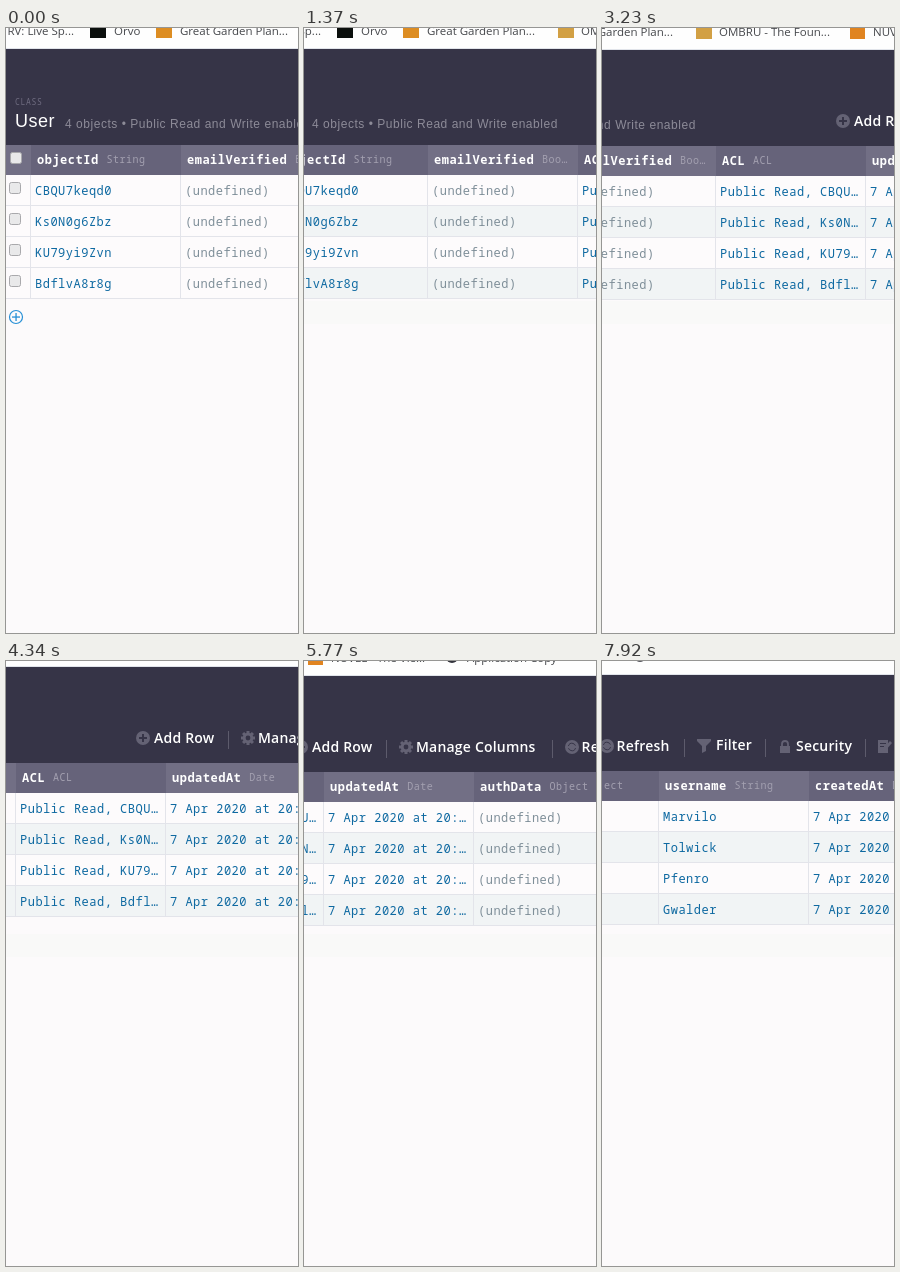
An HTML page with a canvas that plays this animation: 292 by 605 pixels, repeating every 8 s.

```html
<!DOCTYPE html>
<html lang="en">
<head>
<meta charset="utf-8">
<title>Data browser pan</title>
<style>
  html, body { margin: 0; width: 100%; height: 100%; overflow: hidden; background: #fcfafb; }
  canvas { display: block; width: 292px; height: 605px; }
</style>
</head>
<body>
<canvas id="stage" width="292" height="605"></canvas>
<script>
const W = 292, H = 605, LOOP = 8000;
const ctx = document.getElementById('stage').getContext('2d');

const MONO = '"Noto Sans Mono", monospace';
const SANS = '"Open Sans", "Noto Sans", sans-serif';
const ARIAL = '"Liberation Sans", Arial, sans-serif';
const ICON = '#646274', DARK = '#363447', LINK = '#0e69a1', MUTED = '#7f8f99';

// Bursts of camera steps: first time, last time, count
const bursts = [
  [140, 1110, 8], [1250, 1370, 2], [1490, 2270, 7], [2680, 3230, 5], [3370, 3640, 3],
  [3790, 3910, 2], [4340, 4340, 1], [4500, 4880, 4], [5250, 5250, 1], [5370, 5910, 5],
  [6220, 7030, 7], [7480, 7920, 4]
];
const stepTimes = bursts.flatMap(([a, b, n]) =>
  Array.from({ length: n }, (_, k) => a + (n > 1 ? (b - a) * k / (n - 1) : 0)));

// Camera position by step number
const panX = [[0, 0], [10, 51], [22, 211], [28, 315], [33, 385], [41, 585], [49, 718]];
const panY = [[0, 0], [10, 0], [15, 2], [22, 1], [25, 0], [27, -10], [28, -15],
              [33, -5], [41, -8], [45, -5], [49, -7]];

// Monotone cubic through the keys
function curve(keys, s) {
  const slope = i => (keys[i + 1][1] - keys[i][1]) / (keys[i + 1][0] - keys[i][0]);
  const last = keys.length - 1;
  const tangent = i => {
    if (i === 0) return slope(0);
    if (i === last) return slope(last - 1);
    const a = slope(i - 1), b = slope(i);
    return a * b <= 0 ? 0 : 2 * a * b / (a + b);
  };
  let i = 0;
  while (i < last - 1 && s >= keys[i + 1][0]) i++;
  const [x0, y0] = keys[i], [x1, y1] = keys[i + 1];
  const h = x1 - x0, u = (s - x0) / h, v = 1 - u;
  return y0 * (1 + 2 * u) * v * v + tangent(i) * h * u * v * v +
         y1 * u * u * (3 - 2 * u) - tangent(i + 1) * h * u * u * v;
}

const ids = ['CBQU7keqd0', 'Ks0N0g6Zbz', 'KU79yi9Zvn', 'BdflvA8r8g'];
const users = ['Marvilo', 'Tolwick', 'Pfenro', 'Gwalder'];
const none = () => '(undefined)';
const date = () => '7 Apr 2020 at 20:…';
const columns = [
  ['objectId', 'String', r => ids[r]],
  ['emailVerified', 'Boo…', none],
  ['ACL', 'ACL', r => 'Public Read, ' + ids[r].slice(0, 4) + '…'],
  ['updatedAt', 'Date', date],
  ['authData', 'Object', none],
  ['username', 'String', r => users[r]],
  ['createdAt', 'Date', date]
];
const colX = i => 25 + 150 * i;

function box(x, y, w, h, color) {
  ctx.fillStyle = color;
  ctx.fillRect(x, y, w, h);
}
function text(str, x, y, font, color, spacing = 0) {
  ctx.font = font;
  ctx.letterSpacing = spacing + 'px';
  ctx.fillStyle = color;
  ctx.fillText(str, x, y);
}
function disc(x, y, r, color) {
  ctx.fillStyle = color;
  ctx.beginPath();
  ctx.arc(x, y, r, 0, 7);
  ctx.fill();
}
function poly(points, color) {
  ctx.fillStyle = color;
  ctx.beginPath();
  points.forEach(([x, y]) => ctx.lineTo(x, y));
  ctx.fill();
}
function arc(x, y, r, from, to, color, width) {
  ctx.strokeStyle = color;
  ctx.lineWidth = width;
  ctx.beginPath();
  ctx.arc(x, y, r, from, to);
  ctx.stroke();
}
function checkbox(x, y) {
  ctx.fillStyle = '#e9e9ea';
  ctx.strokeStyle = '#a9a9ac';
  ctx.lineWidth = 1;
  ctx.beginPath();
  ctx.roundRect(x + .5, y + .5, 11, 11, 2);
  ctx.fill();
  ctx.stroke();
}

function bookmarks() {
  const label = (str, x) => text(str, x, 7, '11.5px ' + SANS, '#45474b');
  box(-20, -40, 1200, 61, '#fefefe');
  box(-20, 20, 1200, 1, '#e1e4ea');
  ctx.textAlign = 'right';
  label('RV: Live Sp...', 68);
  ctx.textAlign = 'left';
  box(84, -6, 16, 16, '#0b0f0d');
  label('Orvo', 108);
  box(150, -6, 16, 16, '#dd8d22');
  label('Great Garden Plan...', 174);
  box(305, -6, 16, 16, '#d2a044');
  label('OMBRU - The Foun...', 328);
  box(459, -6, 15, 16, '#e08420');
  label('NUVEL - The Vie...', 482);
  disc(603, 2, 6, '#32333b');
  label('Application Copy', 618);
  disc(756, 2, 6, '#55565c');
}

function gear(x, y) {
  for (let i = 0; i < 8; i++) {
    ctx.save();
    ctx.translate(x, y);
    ctx.rotate(i * Math.PI / 4);
    box(-1.5, -7, 3, 4, ICON);
    ctx.restore();
  }
  disc(x, y, 5.3, ICON);
  disc(x, y, 2.4, DARK);
}

function toolbar() {
  const label = (str, x, y = 97) => text(str, x, y, '600 14px ' + SANS, '#fff', .2);
  box(-20, 21, 1200, 96, DARK);
  text('CLASS', 9, 77, '8px ' + MONO, '#6f6c80', .7);
  text('User', 9, 99, '18px ' + ARIAL, '#fff', .5);
  text('4 objects • Public Read and Write enabled', 59, 100, '12px ' + ARIAL, '#8d8b98', .53);

  for (const x of [537, 703, 800, 881, 981]) box(x, 85, 1, 18, '#5d5b6c');

  disc(452, 92, 7, ICON);
  box(448, 91, 8, 2, DARK);
  box(451, 88, 2, 8, DARK);
  label('Add Row', 463);

  gear(557, 92);
  label('Manage Columns', 567);

  disc(723, 92, 7, ICON);
  arc(723, 92, 3.7, 3.4, 5.9, DARK, 1);
  arc(723, 92, 3.7, .3, 2.8, DARK, 1);
  label('Refresh', 732.5);

  poly([[813, 85], [827, 85], [827, 87], [822, 92], [822, 97], [818, 99], [818, 92], [813, 87]], ICON);
  label('Filter', 832, 96);

  box(896, 92, 10, 7, ICON);
  arc(901, 90, 3, Math.PI, 0, ICON, 1.8);
  box(897.1, 90, 1.8, 2, ICON);
  box(903.1, 90, 1.8, 2, ICON);
  label('Security', 912);

  box(994, 86, 10, 13, ICON);
  box(996, 89, 6, 1, DARK);
  box(996, 92, 4, 1, DARK);
  poly([[999, 95], [1006, 87], [1008, 89], [1001, 97], [998, 98]], ICON);
}

function table(striped) {
  for (let r = 0; r < 4; r++) {
    const y = 147 + 31 * r;
    box(-20, y, 1200, 30, striped && r % 2 ? '#f1f4f5' : '#fdfbfc');
    box(-20, y + 30, 1200, 1, '#e3e4ea');
    checkbox(3, y + 7);
  }
  box(-20, 117, 45, 30, '#726f85');
  checkbox(4, 124);
  box(24, 147, 1, 124, '#e3e4ea');
  columns.forEach(([name, type, cell], i) => {
    const x = colX(i);
    box(x, 117, 150, 30, i % 2 ? '#726f85' : '#66637a');
    box(x + 149, 147, 1, 124, '#e3e4ea');
    text(name, x + 6, 136, '600 12px ' + MONO, '#fff', .5);
    text(type, x + 14 + name.length * 7.7, 135, '10px ' + MONO, '#a3a0b0', .5);
    for (let r = 0; r < 4; r++) {
      text(cell(r), x + 4, 167 + 31 * r, '12px ' + MONO, cell === none ? MUTED : LINK, .5);
    }
  });
}

function addButton() {
  arc(10, 289, 6.5, 0, 7, '#2790d6', 1.2);
  box(6, 288.4, 8, 1.3, '#2790d6');
  box(9.4, 285, 1.3, 8, '#2790d6');
}

function draw(t) {
  const step = stepTimes.filter(s => s <= t).length;
  const moved = step > 0;
  box(0, 0, W, H, '#fcfafb');
  if (moved) box(0, 273, W, 23, '#f9f9f8');
  ctx.save();
  ctx.translate(-Math.round(curve(panX, step)), Math.round(curve(panY, step)));
  bookmarks();
  toolbar();
  table(moved);
  addButton();
  ctx.restore();
}

const start = performance.now();
function tick() {
  draw((performance.now() - start) % LOOP);
  requestAnimationFrame(tick);
}
tick();
</script>
</body>
</html>
```
